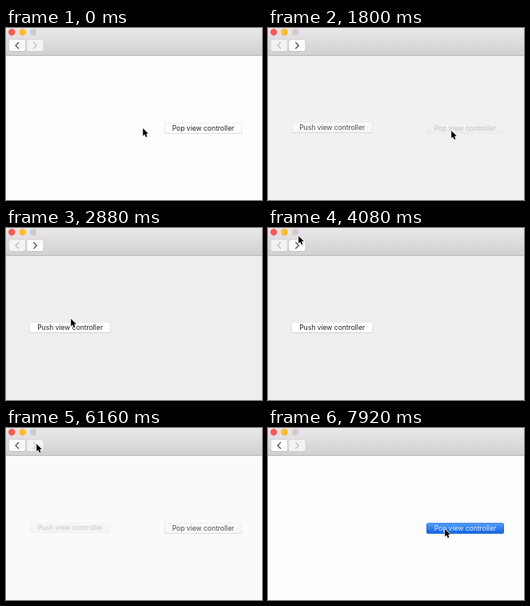
Animation, 320 px wide and 216 px high, one loop 8 s. Source, as an HTML page with a canvas:

```html
<!DOCTYPE html>
<html lang="en">
<head>
<meta charset="utf-8">
<title>View controller navigation</title>
<style>
  html, body { margin: 0; width: 100%; height: 100%; overflow: hidden; background: #fdfdfd; }
  canvas { display: block; width: 320px; height: 216px; }
</style>
</head>
<body>
<canvas id="stage"></canvas>
<script>
const WIDTH = 320, HEIGHT = 216, LOOP = 8000, STEP = 40;
const POP_CLICK = 1200, FORWARD_CLICK = 5560, FADE = 850;

// Pointer tip: time, x, y
const PATH = [
  [0, 171, 126], [400, 212, 128], [760, 229, 129], [1800, 229, 129],
  [2160, 172, 130], [2520, 113, 127], [2880, 81, 114], [3200, 38, 57],
  [3520, 38, 57], [4080, 38, 10], [5000, 38, 10], [5320, 38, 20],
  [6240, 38, 20], [6360, 44, 25], [6800, 122, 70], [7200, 200, 110],
  [7560, 214, 120], [7920, 221, 127], [8000, 221, 127]
];

const canvas = document.getElementById('stage');
const ctx = canvas.getContext('2d');
const scale = window.devicePixelRatio || 1;
canvas.width = WIDTH * scale;
canvas.height = HEIGHT * scale;
ctx.scale(scale, scale);

const clamp = v => Math.min(1, Math.max(0, v));
const smooth = v => v * v * (3 - 2 * v);
const between = (t, start, end) => t >= start && t < end;

function gradient(top, bottom, from, to) {
  const fill = ctx.createLinearGradient(0, top, 0, bottom);
  fill.addColorStop(0, from);
  fill.addColorStop(1, to);
  return fill;
}

function roundBox(x, y, w, h, r, fill) {
  ctx.beginPath();
  ctx.roundRect(x, y, w, h, r);
  ctx.fillStyle = fill;
  ctx.fill();
}

// Slope at a path point; zero beside a pause.
function slope(i, axis) {
  const a = PATH[i - 1], b = PATH[i], c = PATH[i + 1];
  if (!c) return 0;
  if (!a) return (c[axis] - b[axis]) / (c[0] - b[0]);
  const still = (p, q) => p[1] === q[1] && p[2] === q[2];
  return still(a, b) || still(b, c) ? 0 : (c[axis] - a[axis]) / (c[0] - a[0]);
}

function pointerAt(t) {
  let i = 0;
  while (i < PATH.length - 2 && t >= PATH[i + 1][0]) i++;
  const a = PATH[i], b = PATH[i + 1], span = b[0] - a[0], u = (t - a[0]) / span;
  return [1, 2].map(axis =>
    a[axis] + (b[axis] - a[axis]) * smooth(u) +
    span * u * (1 - u) * ((1 - u) * slope(i, axis) - u * slope(i + 1, axis)));
}

function drawPointer([x, y]) {
  ctx.save();
  ctx.translate(x, y);
  ctx.beginPath();
  [[0.2, 0], [0.2, 9.4], [2.3, 7.4], [3.8, 10.9], [5.5, 10.2], [4, 6.8], [6.9, 6.8]]
    .forEach(([px, py]) => ctx.lineTo(px, py));
  ctx.closePath();
  ctx.lineJoin = 'round';
  ctx.lineWidth = 1.4;
  ctx.strokeStyle = '#fff';
  ctx.stroke();
  ctx.fillStyle = '#000';
  ctx.fill();
  ctx.restore();
}

function drawButton(label, x, y, w, alpha, pressed) {
  if (alpha <= 0) return;
  ctx.save();
  ctx.globalAlpha = alpha;
  roundBox(x, y, w, 13.6, 2.6, pressed ? '#1a5fd0' : gradient(y, y + 13.6, '#e2e2e2', '#c4c4c4'));
  roundBox(x + 0.5, y + 0.5, w - 1, 12.5, 2.2,
    pressed ? gradient(y, y + 13, '#529ffa', '#1464e0') : '#fff');
  ctx.font = '8.55px Inter, sans-serif';
  ctx.textAlign = 'center';
  ctx.fillStyle = pressed ? '#e4efff' : '#222';
  ctx.fillText(label, x + w / 2, y + 9.9);
  ctx.restore();
}

function drawNavButton(x, direction, enabled, pressed) {
  roundBox(x, 14.5, 21.6, 15.2, 2.6, enabled ? '#bdbbbd' : '#cbc9cb');
  roundBox(x + 0.5, 14.7, 20.6, 14.3, 2.3, pressed ? '#e3e1e3' : enabled ? '#fdfcfd' : '#f4f2f4');
  const cx = x + 10.8, cy = 22;
  ctx.beginPath();
  ctx.moveTo(cx - 2 * direction, cy - 4);
  ctx.lineTo(cx + 2 * direction, cy);
  ctx.lineTo(cx - 2 * direction, cy + 4);
  ctx.lineWidth = 1.1;
  ctx.strokeStyle = enabled ? '#444' : '#bcbabc';
  ctx.stroke();
}

function drawToolbar(t, onSecond) {
  ctx.fillStyle = gradient(0, 34, '#e9e7e9', '#d2d0d2');
  ctx.fillRect(0, 0, WIDTH, 34);
  ctx.fillStyle = '#bab8ba';
  ctx.fillRect(0, 34, WIDTH, 1);
  ['#fc5b57', '#fdbc2e', '#cecccf'].forEach((color, i) => {
    ctx.beginPath();
    ctx.arc(7.2 + 13.4 * i, 5.3, 4.2, 0, Math.PI * 2);
    ctx.fillStyle = color;
    ctx.fill();
  });
  drawNavButton(3.2, -1, onSecond, false);
  drawNavButton(25.6, 1, !onSecond, between(t, 5320, FORWARD_CLICK));
}

function draw(t) {
  const second = t < FORWARD_CLICK
    ? 1 - smooth(clamp((t - POP_CLICK) / FADE))
    : smooth(clamp((t - FORWARD_CLICK) / FADE));
  const shade = 238 + 15 * second;
  ctx.fillStyle = `rgb(${shade}, ${shade}, ${shade})`;
  ctx.fillRect(0, 0, WIDTH, HEIGHT);
  drawButton('Push view controller', 29.5, 118.3, 101.3, 1 - second, false);
  drawButton('Pop view controller', 198, 119.2, 97, second,
    between(t, 800, POP_CLICK) || t >= 7900);
  drawToolbar(t, !between(t, POP_CLICK, FORWARD_CLICK));
  drawPointer(pointerAt(t));
}

function tick() {
  const t = performance.now() % LOOP;
  draw(Math.floor(t / STEP) * STEP);
  requestAnimationFrame(tick);
}
tick();
</script>
</body>
</html>
```
